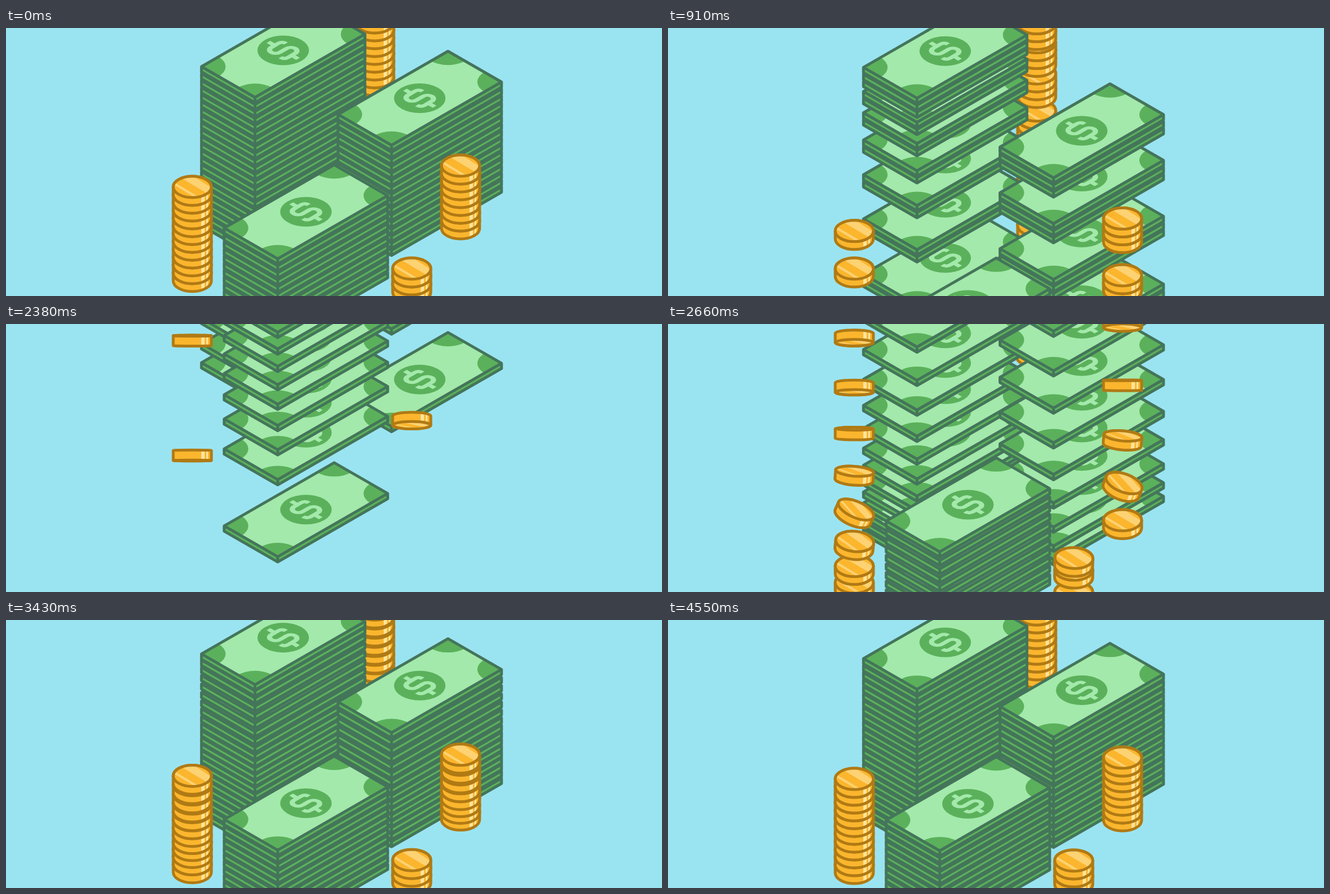
An HTML page with a canvas that plays this animation: 1169x479 px, repeating every 4620 ms.

```html
<!DOCTYPE html>
<html>
<head>
<meta charset="utf-8">
<title>Money stacks</title>
<style>
  html, body { margin: 0; width: 100%; height: 100%; overflow: hidden; background: #9ae4f2; }
  canvas { display: block; }
</style>
</head>
<body>
<canvas id="stage" width="1169" height="479"></canvas>
<script>
const ctx = document.getElementById('stage').getContext('2d');
const LOOP = 4620, STEP = 70, EMPTY = 1700;
const TAU = Math.PI * 2;
const SKY = '#9ae4f2', MINT = '#a3e9ab', GREEN = '#5bb15b', DARK = '#44755a';
const GOLD = '#fbb62e', SHINE = '#fdd273', GLINT = '#ffe49c', BRONZE = '#b07a14';
const OUTLINE = 5, BILL_PITCH = 12.5, COIN_PITCH = 14, LEAVE_BEAT = 45;
const DOLLAR = new Path2D('M13-8Q13-15 6-15H-6a7.5 7.5 0 0 0 0 15H6a7.5 7.5 0 0 1 0 15H-6Q-13 15-13 8M0-26V-15M0 15V26');

// x, y: resting top item. Items land bottom first, from `first` to `last` ms along a
// power curve, and leave bottom first, each `gap` ms before the one above; the top leaves at `leave`.
const bills = (x, y, count, timing) => ({ draw: drawBill, pitch: BILL_PITCH, x, y, count, ...timing });
const coins = (x, y, count, timing) => ({ draw: drawCoin, pitch: COIN_PITCH, x, y, count, ...timing });

const stacks = [
  coins(657, -17, 19, { first: 2600, last: 3080, curve: 1, leave: 845, gap: 15 }),
  bills(494, 40, 23, { first: 2587, last: 3130, curve: 1.3, leave: 848, gap: 22 }),
  bills(737.3, 125.5, 16, { first: 2557, last: 3045, curve: 0.7, leave: 693, gap: 15 }),
  bills(534.5, 328.5, 12, { first: 2511, last: 2670, curve: 0.35, leave: 602, gap: 15 }),
  coins(332, 291, 12, { first: 2555, last: 3012, curve: 0.7, leave: 670, gap: 46 }),
  coins(810, 253, 8, { first: 2645, last: 3008, curve: 0.8, leave: 655, gap: 20 }),
  coins(723, 437, 3, { first: 2595, last: 2680, curve: 0.2, leave: 590, gap: 40 })
];

const landTime = (stack, index) =>
  stack.first + (stack.last - stack.first) * (index / (stack.count - 1)) ** stack.curve;

// Snapping to a beat makes neighbours leave in small bunches.
const leaveTime = (stack, depth) =>
  stack.leave - LEAVE_BEAT * Math.floor(depth * stack.gap / LEAVE_BEAT);

const dropOut = age => 5.7e-6 * Math.max(0, age) ** 3;

// Height above rest: a braking fall, then a damped swing.
const heightIn = age => age < 0
  ? -0.5 * age + 0.004 * age * age
  : -36 * Math.exp(-age / 270) * Math.sin(TAU * age / 480);

function polygon(...points) {
  ctx.beginPath();
  points.forEach(([x, y]) => ctx.lineTo(x, y));
  ctx.closePath();
}

function circle(x, y, r) {
  ctx.beginPath();
  ctx.arc(x, y, r, 0, TAU);
  ctx.fill();
}

function drawBill() {
  const thick = 9.5;
  const left = [-145.7, 29], front = [-50.3, 84], right = [145.7, -29], back = [50.3, -84];
  const below = ([x, y]) => [x, y + thick];
  const silhouette = [left, back, right, below(right), below(front), below(left)];

  polygon(...silhouette);
  ctx.fillStyle = GREEN;
  ctx.fill();

  // Face in the plane of the bill: x along the long side, y along the short one.
  ctx.save();
  ctx.transform(0.866, -0.5, 0.866, 0.5, 0, 0);
  ctx.beginPath();
  ctx.rect(-113, -55, 226, 110);
  ctx.clip();
  ctx.fillStyle = MINT;
  ctx.fill();
  ctx.fillStyle = GREEN;
  for (const x of [-113, 113]) for (const y of [-55, 55]) circle(x, y, 35);
  circle(0, 0, 37.5);
  ctx.scale(1.17, 1.17);
  ctx.strokeStyle = MINT;
  ctx.lineWidth = 6.5;
  ctx.stroke(DOLLAR);
  ctx.restore();

  ctx.strokeStyle = DARK;
  polygon(...silhouette);
  ctx.moveTo(...left);
  ctx.lineTo(...front);
  ctx.lineTo(...right);
  ctx.moveTo(...front);
  ctx.lineTo(...below(front));
  ctx.stroke();
}

function drawCoin(age) {
  // Coins show their edge and underside while falling and tip over before they land.
  let open = 1;
  if (age < -172) open = -0.35 * Math.sin((-172 - age) / 27);
  else if (age < 0) open = Math.cos(age / 110);
  const tilt = 0.42 * Math.exp(-(((age + 75) / 35) ** 2));
  const rx = 34, ry = 19 * Math.abs(open);
  const half = 7 + 2 * (1 - Math.abs(open));
  const faceY = open < 0 ? half : -half;

  ctx.rotate(tilt);
  ctx.strokeStyle = BRONZE;
  const body = new Path2D();
  body.ellipse(0, -half, rx, ry, 0, Math.PI, TAU);
  body.ellipse(0, half, rx, ry, 0, 0, Math.PI);
  body.closePath();
  ctx.fillStyle = GOLD;
  ctx.fill(body);
  ctx.save();
  ctx.clip(body);
  ctx.fillStyle = GLINT;
  ctx.fillRect(16, -40, 6, 80);
  ctx.fillRect(25, -40, 3, 80);
  ctx.restore();
  ctx.stroke(body);

  const face = new Path2D();
  face.ellipse(0, faceY, rx, ry, 0, 0, TAU);
  ctx.fill(face);
  ctx.save();
  ctx.clip(face);
  ctx.translate(0, faceY);
  ctx.scale(1, Math.abs(open));
  ctx.fillStyle = SHINE;
  polygon([-40, -28], [-12, -28], [44, 8], [44, 22]);
  ctx.fill();
  polygon([-40, -13], [-40, -8], [20, 28], [28, 28]);
  ctx.fill();
  ctx.restore();
  ctx.stroke(face);
}

function drawStack(stack, time) {
  const leaving = time < EMPTY;
  for (let i = 0; i < stack.count; i++) {
    const depth = stack.count - 1 - i;
    const age = leaving ? Infinity : time - landTime(stack, i);
    const shift = leaving ? dropOut(time - leaveTime(stack, depth)) : -heightIn(age);
    const y = stack.y + depth * stack.pitch + shift;
    if (y < -110 || y > 575) continue;
    ctx.save();
    ctx.translate(stack.x, y);
    stack.draw(age);
    ctx.restore();
  }
}

function render(now) {
  const time = Math.floor((now % LOOP) / STEP) * STEP;
  ctx.fillStyle = SKY;
  ctx.fillRect(0, 0, 1169, 479);
  ctx.lineJoin = 'round';
  ctx.lineWidth = OUTLINE;
  stacks.forEach(stack => drawStack(stack, time));
}

const start = performance.now();
function tick() {
  render(performance.now() - start);
  requestAnimationFrame(tick);
}
tick();
</script>
</body>
</html>
```
